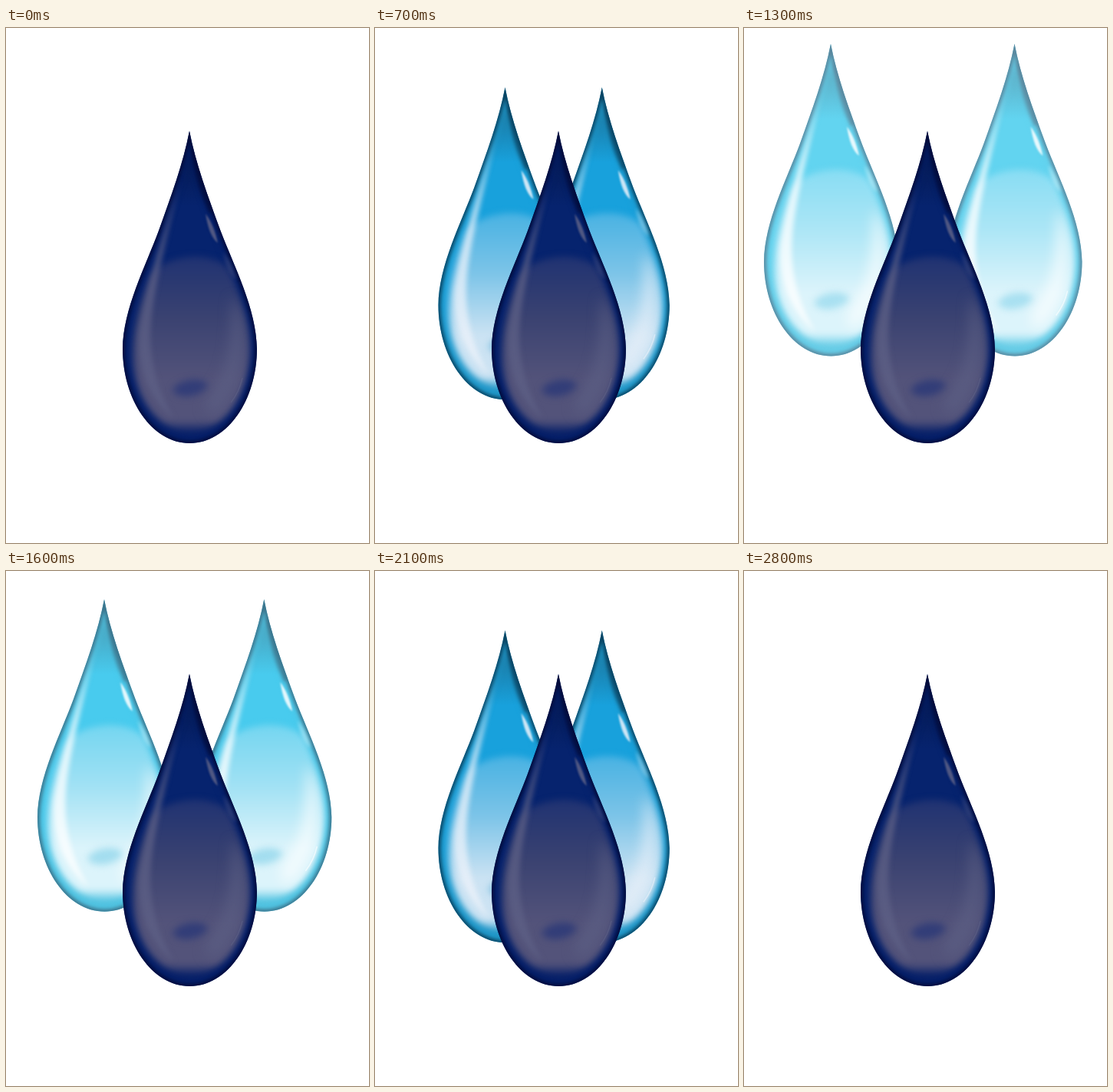
Write an HTML page with a canvas that moves like this. It is 473 px wide and 671 px high and loops after 2.9 s.

```html
<!DOCTYPE html>
<html lang="en">
<head>
<meta charset="utf-8">
<title>Water drops</title>
<style>
  html, body { margin: 0; width: 100%; height: 100%; overflow: hidden; background: #fff; }
  canvas { display: block; }
</style>
</head>
<body>
<canvas id="stage" width="473" height="671"></canvas>
<script>
const ctx = document.getElementById('stage').getContext('2d');

// All paths are relative to the tip of the drop.
const outline = new Path2D('M0 0C8 42 24 85 40.5 130C58 176 87.5 232 88 284C88 350 50 407 .5 407C-49 407 -87 350 -87 284C-86.5 232 -57 176 -40 130C-24 85 -8 42 0 0Z');
const lens = new Path2D('M-54 190C-30 160 30 154 54 182C72 225 81 255 80 290C76 350 45 391 0 393C-45 389 -74 345 -74 290C-74 250 -64 220 -54 190Z');
const leftShine = new Path2D('M-11 55C-22 110 -54 180 -66 262C-70 305 -53 350 -20 375C-42 340 -54 295 -50 250C-46 200 -23 115 -11 55Z');
const rightShine = new Path2D('M21 108C29 118 34 132 37 146C29 140 24 127 21 108Z');
const shoulder = new Path2D('M44 158C52 168 58 180 61 194C53 188 47 174 44 158Z');
const rightGlow = new Path2D('M55 215C80 250 78 320 40 365C10 378 20 352 38 325C52 300 55 260 55 215Z');
const lowShine = new Path2D('M69 322Q65 340 54 354');
const spot = new Path2D('M-22 338C-14 322 18 320 24 331C18 346 -14 352 -22 338Z');
const tipShade = new Path2D('M2 20C6 60 15 85 26 108L31 104L8 30Z');

// Back-drop colours at steps along the outward path.
const colourNames = ['tip', 'body', 'top', 'mid', 'pale', 'rim', 'edge', 'shine', 'spot'];
const colourKeys = [
  [0, '041547 06236e 1f3272 3a4271 53537a 061f68 020a38 5e6186 2f3b78'],
  [4, '05406e 0a78c8 2f8bd2 62a4da b4cae8 0a6ab0 03223f d2def2 5a9fd4'],
  [9, '2b7d98 22bdea 55cbec 8edaf2 dcf3fb 2fb4d6 0c4f6c ffffff 92d6ec'],
  [14, '5a97ac 62d4f0 86dcf3 ace6f6 dcf4fb 66cce6 5a8298 ffffff a4def0']
].map(([step, list]) => [step, list.split(' ').flatMap(hex =>
  [0, 2, 4].map(i => parseInt(hex.slice(i, i + 2), 16)))]);

const leftKeys = [[0, 0], [2, 17], [4, 38.5], [6, 61], [8, 78], [9, 87], [12, 111], [14, 126]]
  .map(([step, x]) => [step, [x]]);

function interpolate(keys, step) {
  const i = Math.max(1, keys.findIndex(key => key[0] >= step));
  const [a, from] = keys[i - 1], [b, to] = keys[i];
  return from.map((v, n) => v + (to[n] - v) * (step - a) / (b - a));
}

function palette(step) {
  const rgb = interpolate(colourKeys, step);
  return Object.fromEntries(colourNames.map((name, i) =>
    [name, `rgb(${rgb.slice(i * 3, i * 3 + 3).map(Math.round)})`]));
}

function vertical(y0, y1, stops) {
  const gradient = ctx.createLinearGradient(0, y0, 0, y1);
  stops.forEach(([at, colour]) => gradient.addColorStop(at, colour));
  return gradient;
}

function soft(path, colour, blur, alpha = 1, lineWidth = 0) {
  ctx.filter = `blur(${blur}px)`;
  ctx.globalAlpha = alpha;
  ctx.fillStyle = ctx.strokeStyle = colour;
  ctx.lineWidth = lineWidth;
  if (lineWidth) ctx.stroke(path); else ctx.fill(path);
}

function drawDrop(x, y, c) {
  ctx.save();
  ctx.translate(x, y);
  ctx.clip(outline);
  ctx.fillStyle = vertical(0, 407, [[0, c.tip], [.24, c.body], [.65, c.body], [1, c.rim]]);
  ctx.fill(outline);
  soft(lens, vertical(160, 394, [[0, c.top], [.35, c.mid], [.7, c.pale], [.93, c.pale], [1, c.rim]]), 4);
  soft(rightGlow, c.shine, 8, .6);
  soft(outline, c.rim, 4, .8, 12);
  soft(outline, c.edge, 2, .9, 6);
  soft(tipShade, c.edge, 2, .6);
  soft(leftShine, c.shine, 3, .75);
  soft(rightShine, c.shine, 1, .85);
  soft(shoulder, c.shine, 2, .4);
  soft(spot, c.spot, 5, .9);
  soft(lowShine, c.shine, .7, .6, 1.5);
  ctx.restore();
}

const frontColours = palette(0);

function stepAt(time) {
  const tick = Math.floor(time / 100);
  if (tick < 13) return tick;
  return tick < 15 ? 14 : 28 - tick;
}

function draw(now) {
  const step = stepAt(now % 2900);
  const shift = step * 113.5 / 14;
  ctx.fillStyle = '#fff';
  ctx.fillRect(0, 0, 473, 671);
  if (step > 0) {
    const colours = palette(step);
    drawDrop(239 - interpolate(leftKeys, step)[0], 134 - shift, colours);
    drawDrop(239 + shift, 134 - shift, colours);
  }
  drawDrop(239, 134, frontColours);
}

let start;
function tick(now) {
  start ??= now;
  draw(now - start);
  requestAnimationFrame(tick);
}
requestAnimationFrame(tick);
</script>
</body>
</html>
```
